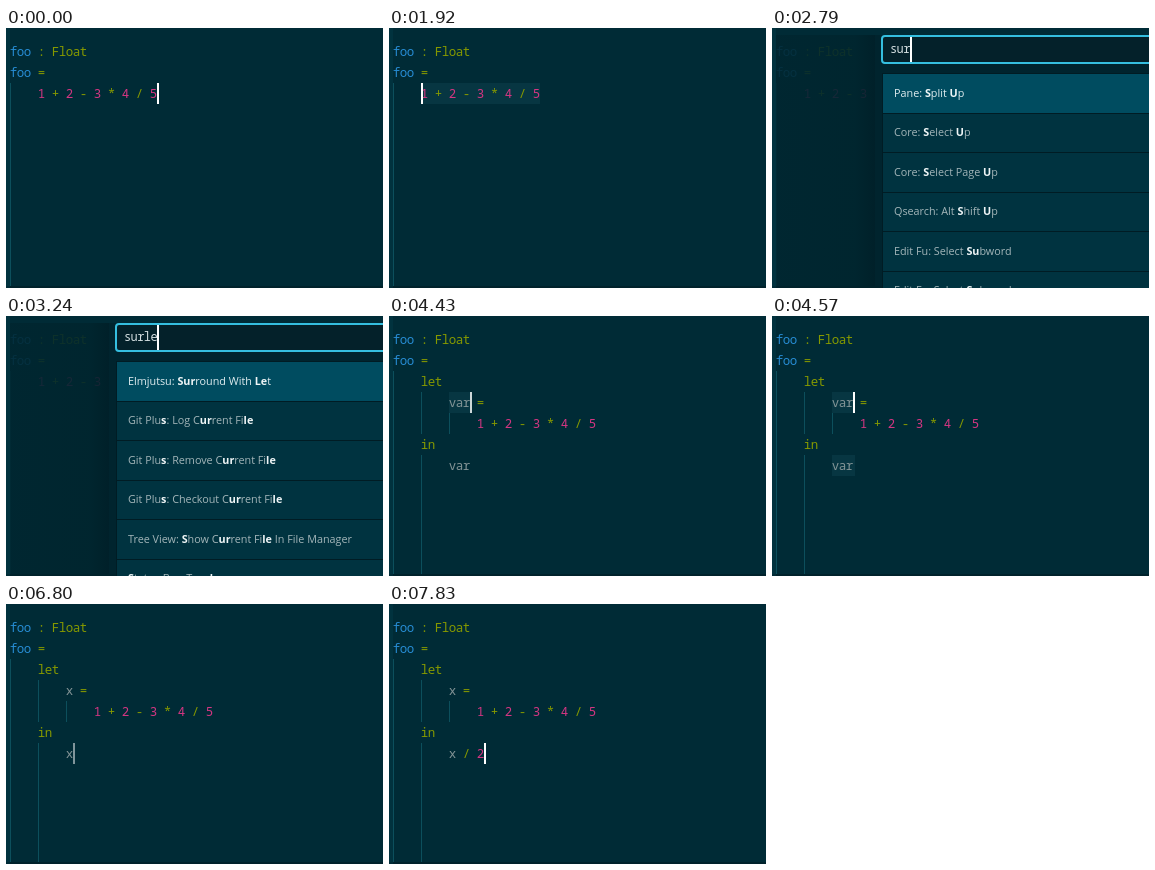
Write an HTML page that moves like this. It is 377 px wide and 260 px high and loops after 8 s.

```html
<!DOCTYPE html>
<html lang="en">
<head>
<meta charset="utf-8">
<title>Surround with let</title>
<style>
html, body { margin: 0; width: 100%; height: 100%; overflow: hidden; background: #002b36; }
svg { display: block; width: 377px; height: 260px; }
.code { font: 12.5px "Noto Sans Mono", monospace; letter-spacing: -.5px; }
.query { font: 12px "Noto Sans Mono", monospace; letter-spacing: -.6px; fill: #d3dee0; }
.item { font: 10.8px "Open Sans", sans-serif; fill: #a3b6b9; white-space: pre; }
.item.on { fill: #e0edf0; }
.item tspan { font-weight: 700; fill: #eef5f6; }
</style>
</head>
<body>
<svg id="stage" viewBox="0 0 377 260"></svg>
<script>
const LOOP = 8000, LEFT = 4, TOP = 13, CW = 7, LH = 21;
const C = {
  bg: '#002b36', edge: '#01323e', guide: '#0c4f5c', sel: '#073642',
  blue: '#268bd2', green: '#859900', pink: '#d33682', text: '#839496', caret: '#fff'
};
const stage = document.getElementById('stage');

const rect = (x, y, w, h, fill, extra = '') =>
  `<rect x="${x}" y="${y}" width="${w}" height="${h}" fill="${fill}" ${extra}/>`;
const colX = col => LEFT + col * CW;
const rowY = row => TOP + row * LH;

// Documents
const sum = '1 + 2 - 3 * 4 / 5';
const head = ['foo : Float', 'foo ='];
const plain = [...head, '    ' + sum];
const withLet = (name, tail = '') => [...head, '    let', `        ${name} =`,
  '            ' + sum, '    in', `        ${name}${tail}`];

// Command lists; *...* marks matched letters
const all = ['Application: About', 'Application: Add Project Folder', 'Application: Hide',
  'Application: Install Update', 'Application: Minimize', 'Application: New File'];
const su = ['Pane: *S*plit *U*p', 'Core: *S*elect *U*p', 'Core: *S*elect Page *U*p',
  'Qsearch: Alt *S*hift *U*p', 'Edit Fu: Select *Su*bword', 'Edit Fu: Select *Su*bword'];
const surle = ['Elmjutsu: *Sur*round With *Le*t', 'Git Plu*s*: Log C*ur*rent Fi*le*',
  'Git Plu*s*: Remove C*ur*rent Fi*le*', 'Git Plu*s*: Checkout C*ur*rent Fi*le*',
  'Tree View: *S*how C*ur*rent Fi*le* In File Manager', '*S*tat*u*s Ba*r*: Togg*le*'];
const s = su.map(t => t.replace(/\*U\*/, 'U').replace('*Su*', '*S*u'));
const sur = surle.map(t => t.replace(/\*(le)\*/i, '$1'));
const surl = surle.map(t => t.replace(/\*(l)e\*/i, '*$1*e'));

function tint(word) {
  if (word === 'foo') return C.blue;
  if (/\d/.test(word)) return C.pink;
  return word === 'var' || word === 'x' ? C.text : C.green;
}

function drawCode(lines) {
  const indent = line => line.search(/\S/) / 4;
  let out = '';
  for (let row = 0; row < 12; row++) {
    const line = lines[row] || '';
    const depth = indent(line || lines[lines.length - 1]);
    for (let g = 0; g < depth; g++) out += rect(colX(g * 4), rowY(row), 1, LH, C.guide);
    for (const m of line.matchAll(/\w+|\S/g))
      out += `<text class="code" x="${colX(m.index) - .25}" y="${rowY(row) + 15}" fill="${tint(m[0])}">${m[0]}</text>`;
  }
  return out;
}

const drawSel = ([col, row, w]) => rect(colX(col), rowY(row), w, LH, C.sel);
const drawCaret = ([col, row, a = 1]) =>
  rect(colX(col), rowY(row), 2, LH, C.caret, `opacity="${a}"`);

function drawPalette({ query, items, alpha = 1 }) {
  const itemY = i => Math.round(46 + i * 39.5);
  let out = rect(4, 7, 373, 251, 'url(#shade)', 'opacity=".9"');
  out += rect(103, 7, 274, 253, '#00242e');
  out += rect(110, 8, 290, 27, '#04212a', 'rx="3" stroke="#35bfe0" stroke-width="2"');
  out += `<text class="query" x="118" y="25">${query}</text>`;
  out += rect(Math.round(118 + query.length * 6.6), 9, 2, 25, C.caret);
  out += rect(110, 45, 267, 215, '#001c24');
  items.forEach((item, i) => {
    const y = itemY(i);
    const label = item.replace(/\*(.+?)\*/g, '<tspan>$1</tspan>');
    out += rect(111, y, 266, itemY(i + 1) - y - 1, i ? '#003340' : '#004c60');
    out += `<text class="item${i ? '' : ' on'}" x="122" y="${Math.round(69 + i * 39.5 - .1)}">${label}</text>`;
  });
  return `<g opacity="${alpha}">${out}</g>`;
}

// Each step changes only the listed parts of the state
const lineSel = [[4, 2, 119]], varSel = [[8, 3, 23], [8, 6, 23]];
const pair = (col, a) => [[col, 3, a], [col, 6, a]];
const pal = (query, items, alpha) => ({ pal: { query, items, alpha } });
const steps = [
  [0, { doc: plain, sel: [], carets: [[21, 2]], pal: null }],
  [150, { carets: [[21, 2, .4]] }],
  [300, { carets: [] }],
  [590, { sel: lineSel, carets: [[4, 2, .6]] }],
  [740, { carets: [[4, 2]] }],
  [1340, { carets: [[4, 2, .6]] }],
  [1490, { carets: [[4, 2, .1]] }],
  [1630, { carets: [] }],
  [1780, { carets: [[4, 2, .5]] }],
  [1920, { carets: [[4, 2]] }],
  [2210, { carets: [], ...pal('', all, .6) }],
  [2360, pal('', all)],
  [2500, pal('s', all)],
  [2650, pal('su', s)],
  [2790, pal('sur', su)],
  [2940, pal('surl', sur)],
  [3090, pal('surle', surl)],
  [3240, pal('surle', surle)],
  [3690, { pal: null, carets: [[4, 2, .5]] }],
  [3840, { carets: [[4, 2]] }],
  [3980, { doc: withLet('var'), sel: [], carets: [[11, 3, .5]] }],
  [4130, { carets: [[11, 3]] }],
  [4280, { sel: varSel.slice(0, 1), carets: [[11, 3, .5]] }],
  [4430, { carets: [[11, 3, .8]] }],
  [4570, { sel: varSel, carets: [[11, 3]] }],
  [4720, { carets: [[11, 3], [11, 6, .5]] }],
  [4870, { carets: pair(11) }],
  [5160, { carets: pair(11, .6) }],
  [5310, { carets: pair(11, .1) }],
  [5460, { carets: [] }],
  [5610, { doc: withLet('x'), sel: [], carets: pair(9, .5) }],
  [5760, { carets: pair(9) }],
  [6360, { carets: pair(9, .4) }],
  [6500, { carets: [] }],
  [6800, { carets: [[9, 6, .5]] }],
  [6950, { carets: [[9, 6]] }],
  [7090, { doc: withLet('x', ' '), carets: [[10, 6]] }],
  [7240, { doc: withLet('x', ' /'), carets: [[11, 6]] }],
  [7380, { doc: withLet('x', ' / '), carets: [[12, 6]] }],
  [7830, { doc: withLet('x', ' / 2'), carets: [[13, 6]] }]
];
let last = {};
const states = steps.map(([at, change]) => (last = { ...last, ...change, at }));

const shade = `<defs><linearGradient id="shade" gradientUnits="userSpaceOnUse" x1="4" x2="103" y1="0" y2="0">
  <stop offset="0" stop-color="#002630"/><stop offset=".8" stop-color="#00252e"/>
  <stop offset="1" stop-color="#001f28"/></linearGradient></defs>`;

function draw(st) {
  const sel = st.pal ? [] : st.sel;
  stage.innerHTML = shade + rect(0, 0, 377, 260, C.bg) + rect(0, 0, 4, 258, C.edge) +
    sel.map(drawSel).join('') + drawCode(st.doc) + st.carets.map(drawCaret).join('') +
    (st.pal ? drawPalette(st.pal) : '') + rect(4, 258, st.pal ? 106 : 373, 2, '#00222b');
}

const start = performance.now();
let shown = null;
function tick() {
  const t = (performance.now() - start) % LOOP;
  const now = states.findLast(st => st.at <= t) || states[0];
  if (now !== shown) draw(shown = now);
  requestAnimationFrame(tick);
}
tick();
</script>
</body>
</html>
```
